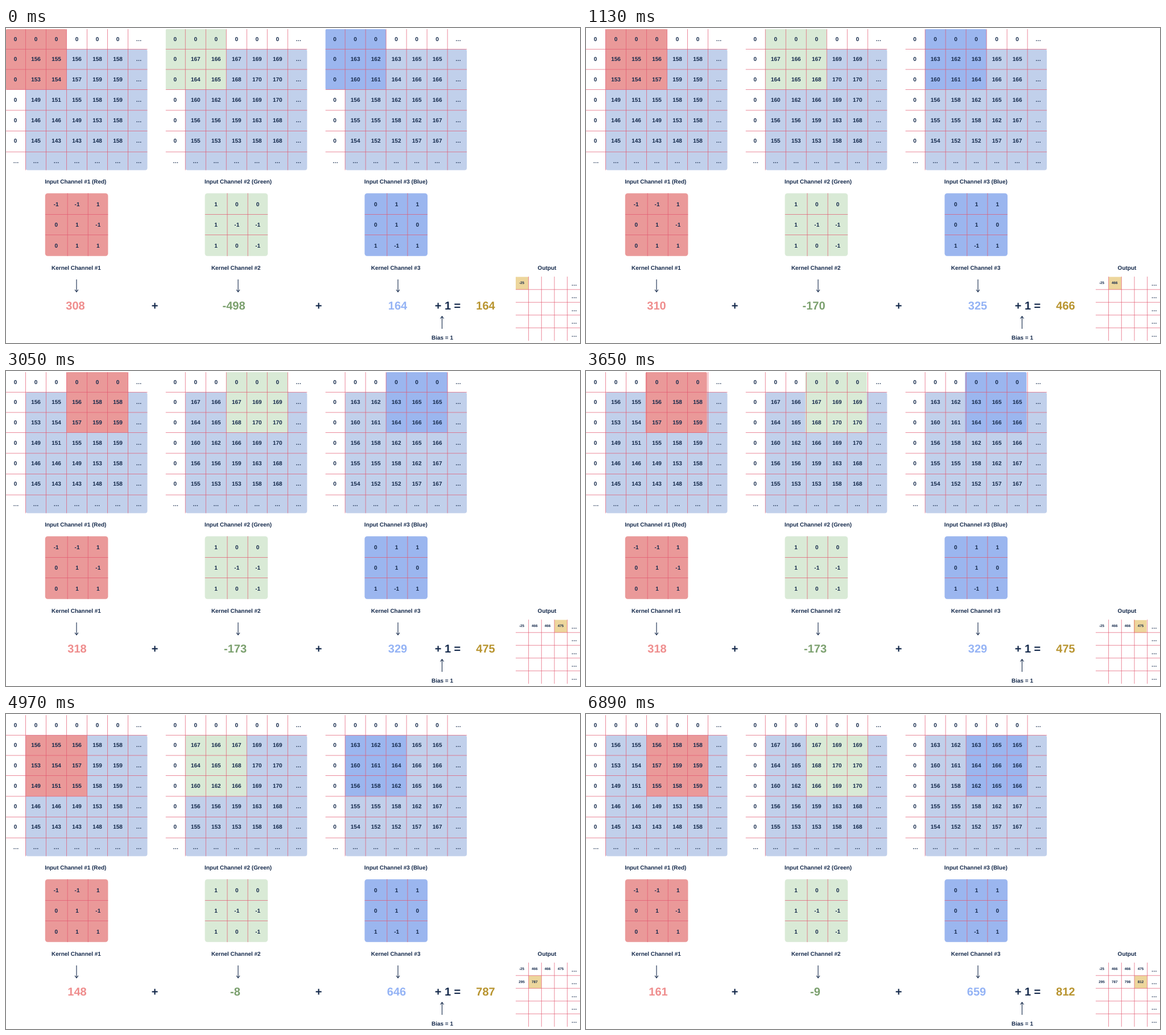
Write an HTML page with a canvas that moves like this. It is 1009 by 555 pixels and loops after 7890 ms.

```html
<!DOCTYPE html>
<html lang="en">
<head>
<meta charset="utf-8">
<title>Convolution over three channels</title>
<style>
html, body { margin: 0; width: 100%; height: 100%; overflow: hidden; background: #fff; }
canvas { display: block; }
</style>
</head>
<body>
<canvas id="stage" width="1009" height="555"></canvas>
<script>
const ctx = document.getElementById('stage').getContext('2d');
const LOOP = 7890;
const STATES = 8;
const NAVY = '#14294b', LINE = '#e2566f', SHEET = '#c1d0eb', GOLD = '#edd69c';
const PITCH = 36;
const ROW_LINES = [37.4, 73, 108.5, 145, 181.5, 218.3];

const parse = text => text.split('/').map(row => row.trim().split(/\s+/).map(Number));

const channels = [
  {
    name: 'Red', x: 0, fill: '#ea9999', ink: '#ef8d8d', arrow: 124,
    pixels: parse('156 155 156 158 158/153 154 157 159 159/149 151 155 158 159/146 146 149 153 158/145 143 143 148 158'),
    kernel: parse('-1 -1 1/0 1 -1/0 1 1'),
    sumX: s => [122, 124, 125, 125, 122.5, 125, 125, 127][s]
  },
  {
    name: 'Green', x: 280.8, fill: '#d9ead6', ink: '#7ba06e', arrow: 408,
    pixels: parse('167 166 167 169 169/164 165 168 170 170/160 162 166 169 170/156 156 159 163 168/155 153 153 158 168'),
    kernel: parse('1 0 0/1 -1 -1/1 0 -1'),
    sumX: s => s < 2 ? 400.5 : 403
  },
  {
    name: 'Blue', x: 561.6, fill: '#9bb6ef', ink: '#94b3f5', arrow: 689,
    pixels: parse('163 162 163 165 165/160 161 164 166 166/156 158 162 165 166/155 155 158 162 167/154 152 152 157 167'),
    kernel: parse('0 1 1/0 1 0/1 -1 1'),
    sumX: s => s < 4 ? 688.5 : 686.5
  }
];

const place = s => ({ col: s % 4, row: Math.floor(s / 4) });

// Padded lookup: the first row and column are zeros.
const padded = (ch, row, col) => row && col ? ch.pixels[row - 1][col - 1] : 0;

function convolve(ch, s) {
  const { col, row } = place(s);
  let sum = 0;
  ch.kernel.forEach((line, r) => line.forEach((k, c) => {
    sum += k * padded(ch, row + r, col + c);
  }));
  return sum;
}

for (const ch of channels) {
  ch.sums = Array.from({ length: STATES }, (_, s) => convolve(ch, s));
}
const outputs = Array.from({ length: STATES }, (_, s) =>
  channels.reduce((sum, ch) => sum + ch.sums[s], 1));
// The first total on the bottom line repeats the blue sum.
const totals = outputs.map((v, s) => s ? v : channels[2].sums[0]);

function label(text, x, y, size = 10, color = NAVY, align = 'center') {
  ctx.font = `bold ${size}px "Liberation Sans", Arial, sans-serif`;
  ctx.textRendering = 'geometricPrecision';
  ctx.textAlign = align;
  ctx.fillStyle = color;
  ctx.fillText(text, x, y + size * 0.36);
}

function line(x1, y1, x2, y2, color = LINE, width = 0.7) {
  ctx.strokeStyle = color;
  ctx.lineWidth = width;
  ctx.beginPath();
  ctx.moveTo(x1, y1);
  ctx.lineTo(x2, y2);
  ctx.stroke();
}

function box(x, y, w, h, r, color) {
  ctx.fillStyle = color;
  ctx.beginPath();
  ctx.roundRect(x, y, w, h, r);
  ctx.fill();
}

function arrow(x, tail, tip) {
  const back = tip + Math.sign(tail - tip) * 4;
  line(x, tail, x, tip, NAVY, 1.1);
  ctx.beginPath();
  ctx.moveTo(x - 3, back);
  ctx.lineTo(x, tip);
  ctx.lineTo(x + 3, back);
  ctx.stroke();
}

function withAlpha(alpha, draw) {
  if (alpha <= 0) return;
  ctx.globalAlpha = Math.min(1, alpha);
  draw();
  ctx.globalAlpha = 1;
}

function blend(pose, draw) {
  if (pose.from === pose.to) return draw(pose.to);
  withAlpha(1 - pose.p, () => draw(pose.from));
  withAlpha(pose.p, () => draw(pose.to));
}

function poseAt(t) {
  let from = 0;
  for (let i = 0; i < STATES - 1; i++) {
    const end = 1130 + 960 * i;
    const start = end - (i === 0 ? 400 : i === 1 ? 390 : 360);
    if (t < start) break;
    if (t < end) {
      const u = (t - start + 28) / (end - start + 28);
      return { from: i, to: i + 1, p: u * u * (3 - 2 * u) };
    }
    from = i + 1;
  }
  return { from, to: from, p: 1 };
}

function currentCell({ from, to, p }) {
  const a = place(from), b = place(to);
  return { col: a.col + (b.col - a.col) * p, row: a.row + (b.row - a.row) * p };
}

function drawInput(ch, cell) {
  ctx.save();
  ctx.translate(ch.x, 0);
  box(34.5, 37.3, 214, 213.3, 4, SHEET);

  const left = Math.max(0, 34.4 + PITCH * (cell.col - 1));
  const right = 106.5 + PITCH * cell.col;
  const top = Math.max(2, 37.4 + PITCH * (cell.row - 1));
  const bottom = 108.5 + 36.5 * cell.row;
  box(left, top, right - left, bottom - top, 2, ch.fill);

  ROW_LINES.forEach((y, i) => {
    const x = 34.5 + PITCH * i;
    line(x, 2, x, 250.5);
    line(0, y, 248.5, y);
  });
  for (let row = 0; row < 7; row++) {
    const y = 18.9 + 35.9 * row;
    for (let col = 0; col < 7; col++) {
      const dots = row === 6 || col === 6;
      const x = 16.5 + 36 * col + (dots && (col === 0 || col === 6) ? 1 : 0);
      label(dots ? '…' : padded(ch, row, col), x, y);
    }
  }
  ctx.restore();
}

function drawKernel(ch, index) {
  ctx.save();
  ctx.translate(ch.x, 0);
  label(`Input Channel #${index + 1} (${ch.name})`, 68.2, 270, 9.95, NAVY, 'left');
  box(68.8, 291.2, 110.6, 110.6, 4.5, ch.fill);
  for (const i of [0, 1]) {
    const x = 108.2 + 36.1 * i, y = 328.5 + 36 * i;
    line(x, 291, x, 402);
    line(69, y, 179.4, y);
  }
  ch.kernel.forEach((row, r) => row.forEach((k, c) => {
    label(k, 88.2 + 36.8 * c, 310 + 36.5 * r);
  }));
  label(`Kernel Channel #${index + 1}`, 80.1, 422, 9.95, NAVY, 'left');
  ctx.restore();
}

function drawSums(pose) {
  for (const ch of channels) {
    arrow(ch.arrow, 443, 465);
    blend(pose, s => label(ch.sums[s], ch.sumX(s), 489, 20, ch.ink));
  }
  label('+', 261.5, 489, 20);
  label('+', 549.5, 489, 20);
  label('+ 1 =', 776.5, 489, 20);
  blend(pose, s => label(totals[s], 843, 489, 20, '#b8942f'));
  arrow(766.5, 530, 508);
  label('Bias = 1', 767, 545.7);
}

function drawOutput(pose, cell) {
  label('Output', 951, 422);
  box(896 + 22.7 * cell.col, 438.5 + 22.5 * cell.row, 22.5, 22.5, 0, GOLD);
  for (let i = 0; i < 4; i++) {
    const x = 918.6 + 22.7 * i, y = 460.8 + 22.5 * i;
    line(x, 438, x, 551);
    line(896, y, 1009, y);
  }
  for (let i = 0; i < 5; i++) label('…', 998.7, 450 + 22.6 * i);
  for (let s = 0; s <= pose.to; s++) {
    const { col, row } = place(s);
    withAlpha(s <= pose.from ? 1 : pose.p, () =>
      label(outputs[s], 906.5 + 22.8 * col, 449 + 22.7 * row, 6.3));
  }
}

function render(t) {
  const pose = poseAt(t);
  const cell = currentCell(pose);
  ctx.fillStyle = '#fff';
  ctx.fillRect(0, 0, 1009, 555);
  channels.forEach((ch, i) => {
    drawInput(ch, cell);
    drawKernel(ch, i);
  });
  drawSums(pose);
  drawOutput(pose, cell);
}

const began = performance.now();
function tick() {
  render((performance.now() - began) % LOOP);
  requestAnimationFrame(tick);
}
tick();
</script>
</body>
</html>
```
